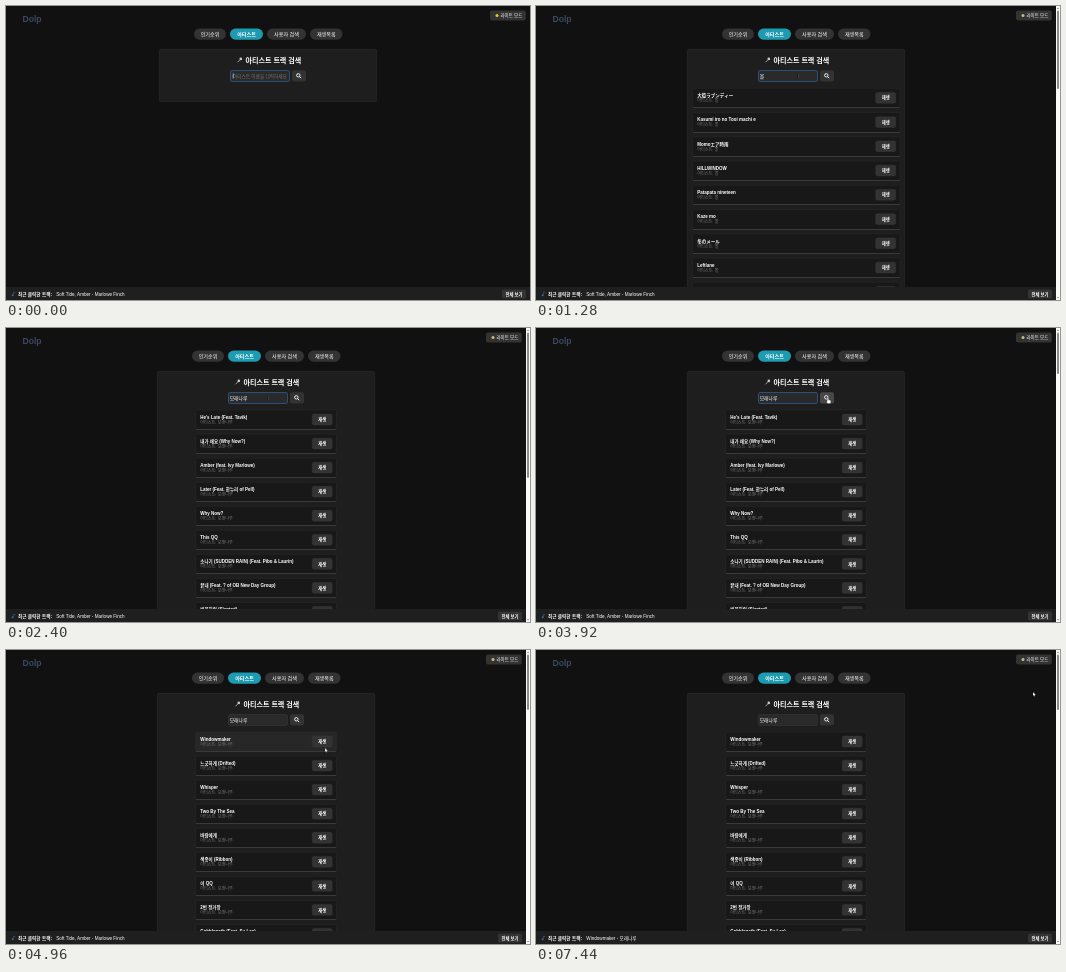
These frames come from a looping animation (524 by 294 pixels, 7.52 s). An HTML page with a canvas:

```html
<!DOCTYPE html>
<html lang="ko">
<head>
<meta charset="utf-8">
<title>Track search</title>
<style>
html, body { margin: 0; width: 100%; height: 100%; overflow: hidden; background: #111; }
canvas { display: block; width: 524px; height: 294px; }
</style>
</head>
<body>
<canvas></canvas>
<script>
const W = 524, H = 294, LOOP = 7520, STEP = 80;
const FONT = '"Liberation Sans", "Noto Sans CJK KR", "Noto Sans CJK JP", "Noto Sans CJK", sans-serif';
const canvas = document.querySelector('canvas');
const scale = window.devicePixelRatio || 1;
canvas.width = W * scale;
canvas.height = H * scale;
const ctx = canvas.getContext('2d');
ctx.scale(scale, scale);

const ARTIST = '모래나루';
const lists = {
  broad: ['大街ラプンディー', 'Kasumi iro no Tooi machi e', 'Momoエア時雨', 'HILLWINDOW',
    'Patapata nineteen', 'Kaze mo', '冬のメール', 'Leftlane', 'Yoake made'],
  first: ["He's Late (Feat. Tavik)", '내가 왜요 (Why Now?)', 'Amber (feat. Ivy Marlowe)',
    'Later (Feat. 한누리 of Pell)', 'Why Now?', 'This QQ',
    '소나기 (SUDDEN RAIN) (Feat. Pibo & Laurin)', '끝내 (Feat. ? of OB New Day Group)', '빗물처럼 (Slanted)'],
  second: ['Windowmaker', '느긋하게 (Drifted)', 'Whisper', 'Two By The Sea', '바람에게',
    '색종이 (Ribbon)', '이 QQ', '2번 정거장', 'Cobblepath (Feat. Su Lee)']
};

// Each track lists [start time, value], held until the next entry.
const typed = [[0, ''], [160, 'ㅁ'], [640, '모'], [1280, '몰'], [1360, '모래'], [1520, '모랜'],
  [1680, '모래나'], [2080, '모래날'], [2320, ARTIST]];
const results = [[0, null], [400, 'broad'], [2320, null], [2400, 'first'], [4160, null], [4400, 'second']];
const thumbEnd = [[0, 120], [1280, 83], [1520, 70], [2400, 150], [2560, 80], [2720, 46], [4400, 60]];
const lastTrack = [[0, 'Soft Tide, Amber - Marlowe Finch'], [5520, 'Windowmaker - ' + ARTIST]];
const pointerPath = [[0, 262, 70], [3280, 262, 70], [3920, 292, 71], [4560, 292, 71], [4960, 319, 98],
  [5280, 317, 93], [5440, 317, 93], [6080, 345, 134], [6320, 347, 136], [6480, 347, 136], [7360, 497, 42]];

const held = (track, t) => track.filter(entry => entry[0] <= t).pop()[1];

function pointerAt(t) {
  const next = pointerPath.findIndex(p => p[0] > t);
  if (next < 0) return pointerPath[pointerPath.length - 1].slice(1);
  const [t0, x0, y0] = pointerPath[next - 1], [t1, x1, y1] = pointerPath[next];
  const u = (t - t0) / (t1 - t0), k = u * u * (3 - 2 * u);
  return [x0 + (x1 - x0) * k, y0 + (y1 - y0) * k];
}

function box(x, y, w, h, r, fill, stroke, lineWidth = 0.5) {
  ctx.beginPath();
  ctx.roundRect(x, y, w, h, r);
  ctx.fillStyle = fill;
  ctx.fill();
  if (stroke) {
    ctx.strokeStyle = stroke;
    ctx.lineWidth = lineWidth;
    ctx.stroke();
  }
}

function text(str, x, y, size, color = '#fff', weight = 400, align = 'left') {
  ctx.font = `${weight} ${size}px ${FONT}`;
  ctx.textAlign = align;
  ctx.fillStyle = color;
  ctx.fillText(str, x, y + size * 0.36);
}

function dot(x, y, r, color) {
  ctx.beginPath();
  ctx.arc(x, y, r, 0, 7);
  ctx.fillStyle = color;
  ctx.fill();
}

function line(color, width, ...points) {
  ctx.beginPath();
  points.forEach(([x, y]) => ctx.lineTo(x, y));
  ctx.strokeStyle = color;
  ctx.lineWidth = width;
  ctx.stroke();
}

function polygon(fill, ...points) {
  ctx.beginPath();
  points.forEach(([x, y]) => ctx.lineTo(x, y));
  ctx.closePath();
  ctx.fillStyle = fill;
  ctx.fill();
}

function drawHeader(shift, right) {
  text('Dolp', 16.5, 13.2, 8.6, '#3d4860', 700);
  box(right - 40, 4.4, 35.8, 10.2, 2, '#333');
  dot(right - 33, 9.6, 1.5, shift ? '#c9bd7a' : '#f2c511');
  text('라이트 모드', right - 29.6, 9.6, 4.5);
  [['인기순위', 188, 32], ['아티스트', 224, 33], ['사용자 검색', 261, 39], ['재생목록', 304, 32.5]]
    .forEach(([label, x, w], i) => {
      const active = i === 1;
      box(x - shift, 22.5, w, 11.2, 5.6, active ? '#1d9bb0' : '#333');
      text(label, x - shift + w / 2, 28.1, 5.1, '#fff', active ? 700 : 400, 'center');
    });
}

function drawSearch(t, shift, hover) {
  const x = 224 - shift, query = held(typed, t), focused = t < 4080;
  line('#aaa', 0.9, [231.5 - shift, 56.3], [234.5 - shift, 53.2]);
  dot(234.8 - shift, 52.9, 1.3, '#ccc');
  text('아티스트 트랙 검색', 239.5 - shift, 54, 7.05, '#fff', 700);

  box(x + 0.5, 64.5, 59, 11, 1.6, '#2a2a2a', focused ? '#28507f' : '#3a3a3a', focused ? 1 : 0.5);
  if (query) {
    text(query, x + 1.7, 70.1, 4.8);
  } else {
    text('아티스트 이름을 입력하세요', x + 3, 70.1, 4.65, '#757575');
    line('#fff', 0.6, [x + 3.2, 67.5], [x + 3.2, 72.5]);
  }

  box(286 - shift, 64.2, 14, 11.3, 2, hover ? '#484848' : '#333');
  ctx.beginPath();
  ctx.arc(292.3 - shift, 69.3, 1.7, 0, 7);
  ctx.strokeStyle = '#fff';
  ctx.lineWidth = 0.9;
  ctx.stroke();
  line('#fff', 1, [293.5 - shift, 70.5], [295.2 - shift, 72.2]);
}

function drawResults(name, artist, px, py) {
  const broad = name === 'broad';
  const x = broad ? 156.5 : 189.5, w = broad ? 207.5 : 141;
  const top = broad ? 82.3 : 82, pitch = broad ? 24.25 : 24.06;
  lists[name].forEach((title, i) => {
    const y = top + i * pitch, bottom = Math.floor(y + 19.5) + 0.5;
    const inCard = px > x && px < x + w && py > y && py < y + 20;
    const inButton = inCard && px > x + w - 24.5 && px < x + w - 4.5 && py > y + 4 && py < y + 15;
    box(x, y, w, bottom - y, 1.5, inCard ? '#272727' : '#181818', '#2a2a2a', 0.5);
    line('#3a3a3a', 1, [x + 0.5, bottom], [x + w - 0.5, bottom]);
    text(title, x + 4.8, y + 7.2, 4.5, '#fff', 700);
    text('아티스트: ' + artist, x + 4.8, y + 12.4, 4.1, '#777');
    box(x + w - 24.3, y + 4.1, 20, 10.8, 1.6, inButton ? '#484848' : '#333', '#3a3a3a', 0.4);
    text('재생', x + w - 14.3, y + 9.6, 4.3, '#fff', 700, 'center');
  });
}

function drawFooter(t, right) {
  box(0, 281, right, 13, 0, '#1f1f1f');
  dot(6.6, 289.3, 1, '#46618f');
  line('#46618f', 0.6, [7.4, 289.3], [7.4, 286.3], [9.4, 286.8]);
  text('최근 클릭한 트랙:', 12, 288, 4.65, '#fff', 700);
  text(held(lastTrack, t), 50.3, 288, 4.6);
  box(right - 28, 283.6, 24, 9, 1.5, '#333');
  text('전체 보기', right - 16, 288.1, 4.3, '#fff', 700, 'center');
}

function drawScrollbar(end) {
  box(520, 0, 4, H, 0, '#fafafa');
  box(521, 4.5, 2, end - 4.5, 1, '#8b8b8b');
  polygon('#8b8b8b', [522, 1.4], [523.2, 3], [520.8, 3]);
  polygon('#8b8b8b', [522, 292.6], [523.2, 291], [520.8, 291]);
}

function drawPointer(x, y, kind) {
  if (kind === 'text') {
    line('#0a0a0a', 0.8, [x, y - 2.5], [x, y + 2.5]);
    line('#999', 0.3, [x + 0.6, y - 2.5], [x + 0.6, y + 2.5]);
  } else if (kind === 'hand') {
    box(x - 0.9, y - 1, 1.4, 4, 0.6, '#fff', '#111', 0.3);
    box(x - 1.2, y + 1, 4, 3.6, 1, '#fff', '#111', 0.3);
  } else {
    const shape = [[x, y], [x, y + 4], [x + 0.9, y + 3.2], [x + 1.6, y + 4.4],
      [x + 2.2, y + 4.1], [x + 1.6, y + 2.9], [x + 2.7, y + 2.8]];
    polygon('#fff', ...shape);
    line('#111', 0.2, ...shape, shape[0]);
  }
}

function draw(t) {
  const name = held(results, t), shift = name ? 2 : 0;
  const right = name ? 520 : W;
  const [px, py] = pointerAt(t);
  const onRow = py > 64 && py < 76;
  const onInput = onRow && px < 284 - shift;
  const onSearch = onRow && px > 286 - shift && px < 300 - shift;
  const onPlay = name === 'second' && px > 306 && px < 326 && py > 86 && py < 97;

  box(0, 0, W, H, 0, '#111');
  drawHeader(shift, right);
  box(153.3 - shift, 43.3, 217.4, name ? 260 : 52.4, 2, '#1e1e1e', '#303030');
  drawSearch(t, shift, onSearch);
  if (name) drawResults(name, name === 'broad' ? '몰' : ARTIST, px, py);
  drawFooter(t, right);
  if (name) drawScrollbar(held(thumbEnd, t));
  drawPointer(px, py, onInput ? 'text' : onSearch || onPlay ? 'hand' : 'arrow');
}

const start = performance.now();
function tick() {
  const t = (performance.now() - start) % LOOP;
  draw(Math.floor(t / STEP) * STEP);
  requestAnimationFrame(tick);
}
tick();
</script>
</body>
</html>
```
